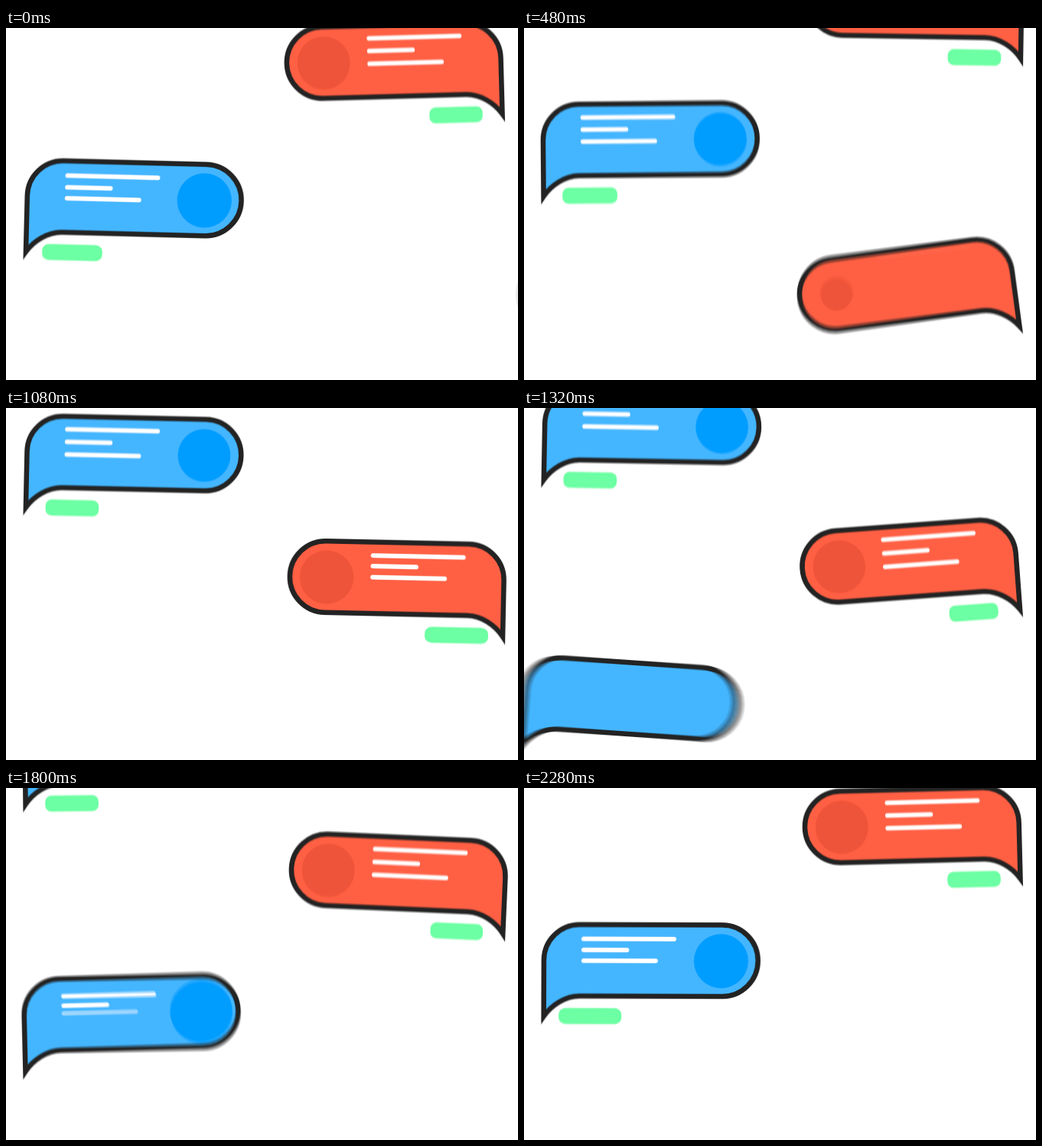
Write an HTML page with a canvas that moves like this. It is 669 px wide and 461 px high and loops after 2.32 s.

```html
<!DOCTYPE html>
<html lang="en">
<head>
<meta charset="utf-8">
<title>Chat bubbles</title>
<style>
  html, body { margin: 0; width: 100%; height: 100%; overflow: hidden; background: #fff; }
  canvas { display: block; }
</style>
</head>
<body>
<canvas id="stage" width="669" height="461"></canvas>
<script>
const W = 669, H = 461;
const LOOP = 2320, STEP = 40;
const SHUTTER = 20, SAMPLES = 12;
const RISE = 350 / LOOP;

const stage = document.getElementById('stage').getContext('2d');
const layer = document.createElement('canvas');
layer.width = W;
layer.height = H;
const g = layer.getContext('2d');

const BLUE = { x: 22.7, y: 478, side: 1, delay: LOOP / 2, fill: '#44b6ff', dot: '#009dff' };
const RED = { x: 651.8, y: 472.5, side: -1, delay: 0, fill: '#ff6044', dot: '#ee5439' };

const LINES = [
  { y: -113.6, len: 124, at: 555 },
  { y: -97.2, len: 62.5, at: 618 },
  { y: -80.6, len: 100, at: 680 }
];

const clamp = v => Math.max(0, Math.min(1, v));

// Decaying swing that starts at ms = 0; approaches it in a straight line before.
function swing(ms, amp, freq, decay) {
  const s = ms / 1000, w = 2 * Math.PI * freq;
  return s < 0 ? amp * w * s : amp * Math.sin(w * s) * Math.exp(-decay * s);
}

// Linear growth from 0 to 1, then overshoot.
function grow(ms) {
  const lead = 180;
  return ms < 0 ? clamp(1 + ms / lead) : 1 + swing(ms, 0.28, 2, 3.3);
}

// The origin is the tip of the tail.
const body = new Path2D();
body.moveTo(3, -10);
body.lineTo(3, -83.5);
body.arc(49.8, -83.5, 46.8, Math.PI, Math.PI * 1.5);
body.lineTo(236, -130.3);
body.arc(236, -83.5, 46.8, -Math.PI / 2, Math.PI / 2);
body.lineTo(50, -36.7);
body.bezierCurveTo(31, -36.7, 13, -24.5, 3, -10);
body.closePath();

function pill(x, y, w, h, r, color) {
  g.fillStyle = color;
  g.beginPath();
  g.roundRect(x, y, w, h, r);
  g.fill();
}

function drawBubble(b, age) {
  const slide = 310 * Math.pow(1 - clamp(age / 300), 3);
  const tilt = swing(age - 115, 14.7, 1, 1) * Math.PI / 180;

  g.save();
  g.translate(b.x - b.side * slide, b.y - RISE * age);
  g.scale(b.side, 1);
  g.rotate(tilt);

  g.fillStyle = b.fill;
  g.fill(body);
  g.strokeStyle = '#232323';
  g.lineWidth = 6.5;
  g.miterLimit = 10;
  g.stroke(body);

  const dot = grow(age - 552);
  if (dot > 0) {
    g.fillStyle = b.dot;
    g.beginPath();
    g.arc(234.5, -83, 34.3 * dot, 0, 2 * Math.PI);
    g.fill();
  }

  for (const line of LINES) {
    const ms = age - line.at;
    const alpha = clamp(1 + ms / 75);
    if (!alpha) continue;
    g.globalAlpha = alpha;
    const x = b.side > 0 ? 52 : 177.5 - line.len;
    pill(x, line.y + swing(ms, 8.5, 2, 2) - 3, line.len, 6, 3, '#fff');
  }
  g.globalAlpha = 1;

  const tag = grow(age - 985);
  if (tag > 0) {
    g.translate(63.5, -10.5);
    g.scale(tag, 1);
    pill(-34.8, -10.4, 69.6, 20.8, 8, '#6cffa3');
  }
  g.restore();
}

function drawScene(t) {
  g.fillStyle = '#fff';
  g.fillRect(0, 0, W, H);
  for (const b of [BLUE, RED]) {
    for (let k = 0; k < 3; k++) {
      const age = t - b.delay + k * LOOP;
      if (age >= 0) drawBubble(b, age);
    }
  }
}

// Averages several moments within the shutter for motion blur.
function render(t) {
  for (let i = 0; i < SAMPLES; i++) {
    drawScene(t + ((i + 0.5) / SAMPLES - 0.5) * SHUTTER);
    stage.globalAlpha = 1 / (i + 1);
    stage.drawImage(layer, 0, 0);
  }
}

const start = performance.now();
let shown = -1;

function tick() {
  const t = (performance.now() - start) % LOOP;
  const step = Math.floor(t / STEP);
  if (step !== shown) {
    shown = step;
    render(step * STEP);
  }
  requestAnimationFrame(tick);
}
tick();
</script>
</body>
</html>
```
